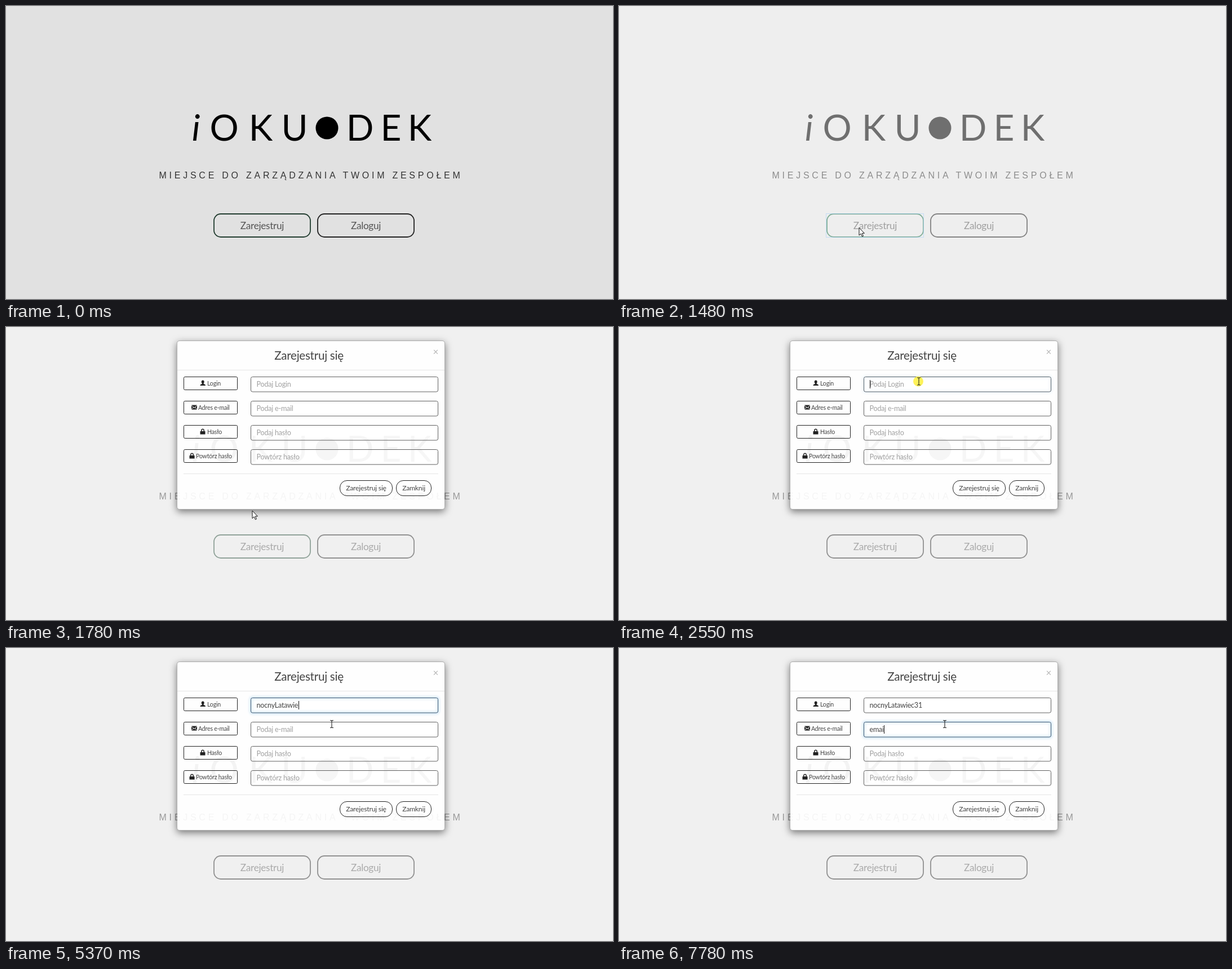
An HTML page for the animation above (8 s loop, 1077 by 520 pixels).

```html
<!DOCTYPE html>
<html lang="pl">
<head>
<meta charset="utf-8">
<title>Rejestracja</title>
<style>
  html, body { margin: 0; width: 100%; height: 100%; overflow: hidden; background: #e1e1e1; }
  svg, #shade, #modal { position: absolute; left: 0; top: 0; width: 1077px; height: 520px; }
  svg { overflow: visible; }
  text { font-family: Lato, "Open Sans", sans-serif; fill: #444; }
  rect { fill: none; }
  .mid { text-anchor: middle; }
  .logo { font-size: 64px; fill: #000; }
  .tagline { font: 16px "Liberation Sans", Arial, sans-serif; letter-spacing: 4.75px; fill: #333; }
  .big { font-size: 17.2px; letter-spacing: -.3px; fill: #555; }
  .big-btn { stroke: #222; stroke-width: 1.8; }
  #outline { stroke: #6db4f5; opacity: .65; }
  #shade { background: #fff; }
  #panel {
    position: absolute; left: 303px; top: 24px; width: 474px; height: 298px;
    border: 1px solid rgba(0,0,0,.28); border-radius: 5px;
    background: rgba(255,255,255,.9); background-clip: padding-box;
    box-shadow: 0 4px 13px rgba(0,0,0,.5);
  }
  .title { font-size: 20.6px; letter-spacing: -.27px; }
  .close { font-size: 17px; fill: #b4b4b4; }
  .rule { stroke: #e5e5e5; }
  .label { font-size: 10.6px; letter-spacing: -.2px; }
  .icon { fill: #222; }
  .box { stroke: #222; }
  .field { stroke: #606060; }
  .glow { stroke: #66afe9; stroke-width: 5; opacity: 0; filter: blur(2px); }
  .value { font-size: 12.6px; letter-spacing: -.23px; }
  .btn { font-size: 12.2px; letter-spacing: -.22px; }
  .caret { stroke: #111; }
  .tip { font: 8.6px "Noto Sans", sans-serif; fill: #666; }
</style>
</head>
<body>
<svg viewBox="0 0 1077 520">
  <text class="logo mid" y="239"><tspan x="337" font-style="italic">i</tspan><tspan x="387 452 512">OKU</tspan><tspan x="628 683 734">DEK</tspan></text>
  <circle cx="569.5" cy="216.5" r="20"/>
  <text class="tagline" x="271.5" y="306">MIEJSCE DO ZARZĄDZANIA TWOIM ZESPOŁEM</text>
  <rect id="join" class="big-btn" x="369" y="369" width="171" height="41" rx="12"/>
  <rect class="big-btn" x="553" y="369" width="171" height="41" rx="12"/>
  <text class="big mid" x="454.5" y="395.5">Zarejestruj</text>
  <text class="big mid" x="638.5" y="395.5">Zaloguj</text>
  <rect id="outline" x="367.5" y="368.5" width="173" height="42"/>
</svg>

<div id="shade"></div>

<div id="modal">
  <div id="panel"></div>
  <svg viewBox="0 0 1077 520">
    <text class="title mid" x="537.5" y="57.5">Zarejestruj się</text>
    <text class="close mid" x="762.5" y="50">×</text>
    <path class="rule" d="M304 76.5H778M315 260.5H767"/>
    <g id="rows"></g>
    <rect class="box" x="592.5" y="272.5" width="93" height="27" rx="12.5"/>
    <rect class="box" x="692.5" y="272.5" width="62" height="27" rx="12.5"/>
    <text class="btn mid" x="639" y="290">Zarejestruj się</text>
    <text class="btn mid" x="723.5" y="290">Zamknij</text>
  </svg>
</div>

<svg viewBox="0 0 1077 520">
  <g id="tip">
    <rect x="579" y="146" width="80" height="14" style="fill:#888;opacity:.45"/>
    <rect x="576.5" y="142.5" width="80" height="15" style="fill:#fff;stroke:#aaa"/>
    <text class="tip" x="581" y="153">Wypełnij to pole.</text>
  </g>
  <g id="pointer">
    <circle id="halo" cx="-1" r="9" fill="#fff03c" opacity=".85"/>
    <path id="arrow" d="M0 0V13.5L3.2 10.6L5.4 15.6L7.4 14.7L5.3 9.8H9.4Z" fill="#fff" stroke="#111"/>
    <path id="beam" d="M-3 -6.5H-1L0 -5.5L1 -6.5H3M0 -5.5V5.5M-3 6.5H-1L0 5.5L1 6.5H3" fill="none" stroke="#222" stroke-width="1.1"/>
  </g>
</svg>

<script>
const LOOP = 8000;
const $ = id => document.getElementById(id);
const clamp = v => Math.min(1, Math.max(0, v));
const ramp = (t, from, to) => clamp((t - from) / (to - from));
const easeOut = p => 1 - (1 - p) ** 1.7;
const smooth = p => p * p * (3 - 2 * p);
const show = (el, on) => el.style.display = on ? '' : 'none';
const mix = (a, b, p) => `rgb(${a.map((v, i) => Math.round(v + (b[i] - v) * p))})`;

const ICONS = {
  user: 'M4.7 -5C8 -5 7.6 -.6 6.1 .7V1.6C8.2 2.3 9.5 2.7 9.5 4.6H0C0 2.7 1.2 2.3 3.4 1.6V.7C1.8 -.6 1.5 -5 4.7 -5Z',
  mail: 'M0 -4H10L5 .4ZM0 -3L3.2 -.2L0 3.2ZM10 -3L6.8 -.2L10 3.2ZM0 4L3.8 .4L5 1.4L6.2 .4L10 4Z',
  lock: 'M0 -.5H1.5V-2C1.5 -6 7.5 -6 7.5 -2V-.5H9V5H0ZM3 -.5H6V-2C6 -4 3 -4 3 -2Z'
};

// label, label x, icon, icon x, placeholder
const ROWS = [
  ['Login', 357, 'user', 344.5, 'Podaj Login'],
  ['Adres e-mail', 341, 'mail', 329, 'Podaj e-mail'],
  ['Hasło', 357, 'lock', 344.5, 'Podaj hasło'],
  ['Powtórz hasło', 337, 'lock', 325.5, 'Powtórz hasło']
];
const rowY = i => 88 + 43 * i;

$('rows').innerHTML = ROWS.map(([label, lx, icon, ix], i) => {
  const y = rowY(i);
  return `<g>
    <rect class="box" x="315.5" y="${y + .5}" width="95" height="23" rx="2"/>
    <path class="icon" fill-rule="evenodd" transform="translate(${ix} ${y + 11.5})" d="${ICONS[icon]}"/>
    <text class="label" x="${lx}" y="${y + 15.5}">${label}</text>
    <rect class="glow" x="434.5" y="${y + .5}" width="332" height="26.5" rx="3"/>
    <rect class="field" x="434.5" y="${y + .5}" width="332" height="26.5" rx="3" style="fill:rgba(255,255,255,.25)"/>
    <text class="value" x="444.5" y="${y + 18}"></text>
    <path class="caret" d="M0 ${y + 6}V${y + 21}"/>
  </g>`;
}).join('');

const rows = [...$('rows').children].map((g, i) => ({
  hint: ROWS[i][4],
  glow: g.querySelector('.glow'),
  field: g.querySelector('.field'),
  value: g.querySelector('.value'),
  caret: g.querySelector('.caret'),
  text: '', keys: [], focus: LOOP, blur: LOOP
}));
Object.assign(rows[0], {
  text: 'nocnyLatawiec31', focus: 2500, blur: 6700,
  keys: [3640, 3790, 3870, 4020, 4570, 4740, 4820, 4970, 5050, 5120, 5200, 5370, 5450, 5600, 5920]
});
Object.assign(rows[1], { text: 'emai', focus: 6700, keys: [7470, 7540, 7710, 7780] });

// time, x, y
const PATH = [
  [70, 940, 512], [400, 640, 450], [840, 426, 393.5], [1660, 426, 393.5],
  [2030, 470, 125], [2240, 545, 8], [2480, 532, 96.5], [2640, 532, 96.5], [2980, 578, 135]
];

function pointerAt(t) {
  const n = PATH.findIndex(k => k[0] > t);
  if (n < 0) return PATH[PATH.length - 1].slice(1);
  if (n === 0) return null;
  const [t0, x0, y0] = PATH[n - 1], [t1, x1, y1] = PATH[n];
  const p = smooth(ramp(t, t0, t1));
  return [x0 + (x1 - x0) * p, y0 + (y1 - y0) * p];
}

function drawRow(row, t) {
  const typed = row.keys.filter(k => k <= t);
  const text = row.text.slice(0, typed.length);
  row.value.textContent = text || row.hint;
  row.value.style.fill = text ? '#444' : '#a0a0a0';

  const glow = ramp(t, row.focus, row.focus + 150) - ramp(t, row.blur, row.blur + 150);
  row.glow.style.opacity = glow * .3;
  row.field.style.stroke = mix([96, 96, 96], [62, 88, 108], glow);

  // the blink restarts with each key
  const last = Math.max(row.focus, ...typed);
  const on = t >= row.focus && t < row.blur && (t - last) % 1060 < 535;
  show(row.caret, on);
  if (on) {
    const w = text ? row.value.getComputedTextLength() : 0;
    row.caret.setAttribute('transform', `translate(${Math.round(445 + w) + .5} 0)`);
  }
}

function drawPointer(t) {
  const at = pointerAt(t);
  show($('pointer'), at);
  if (!at) return;
  const [x, y] = at;
  const inField = t > 1780 && x > 434 && x < 767 && y > 88 && y < 244 && (y - 88) % 43 < 27;
  $('pointer').setAttribute('transform', `translate(${x} ${y})`);
  show($('arrow'), !inField);
  show($('beam'), inField);
  show($('halo'), t >= 2460 && t < 2700);
}

function draw(t) {
  const hover = .35 * (1 - ramp(t, 0, 150)) + ramp(t, 700, 840) - ramp(t, 1700, 1850);
  $('join').style.stroke = mix([34, 34, 34], [30, 110, 70], hover);
  show($('outline'), t >= 1080 && t < 1780);

  $('shade').style.opacity = .5 * ramp(t, 1350, 1500);
  $('modal').style.opacity = ramp(t, 1500, 1630);
  $('modal').style.transform = `translateY(${-75 * (1 - easeOut(ramp(t, 1470, 1770)))}px)`;

  rows.forEach(row => drawRow(row, t));
  $('tip').style.opacity = ramp(t, 3400, 3600) - ramp(t, 3640, 3870);
  drawPointer(t);
}

const start = performance.now();
function tick() {
  draw((performance.now() - start) % LOOP);
  requestAnimationFrame(tick);
}
tick();
</script>
</body>
</html>
```
